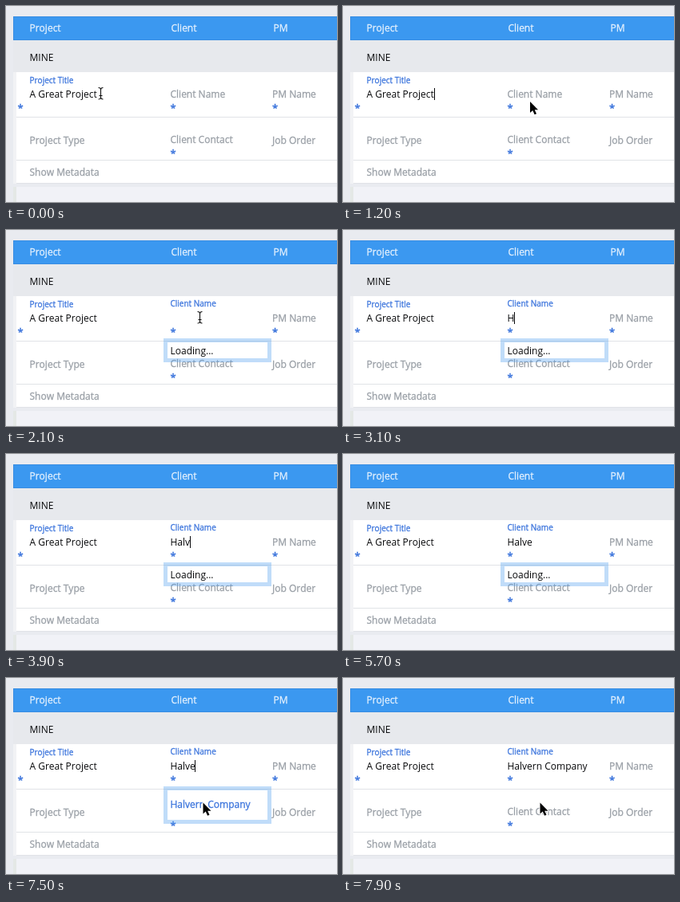
Recreate the animation shown at these times as an HTML page with a canvas. Size 414 by 246 pixels, loop 8 s.

```html
<!DOCTYPE html>
<html lang="en">
<head>
<meta charset="utf-8">
<title>Project form</title>
<style>
  html, body { margin: 0; width: 100%; height: 100%; overflow: hidden; background: #e9ebf0; }
  canvas { display: block; width: 414px; height: 246px; }
</style>
</head>
<body>
<canvas id="stage"></canvas>
<script>
const W = 414, H = 246, LOOP = 8000, STEP = 100;
const INK = '#08090b', HINT = '#999fa6', BLUE = '#3b74dc', PALE = '#e3f0fd';
const COMPANY = 'Halvern Company';
const CLIENT_X = 205.5;

const canvas = document.getElementById('stage');
const ctx = canvas.getContext('2d');
const ratio = window.devicePixelRatio || 1;
canvas.width = W * ratio;
canvas.height = H * ratio;

// [time, number of letters in the client field]
const typing = [[3000, 1], [3400, 2], [3500, 3], [3900, 4], [4200, 5], [7700, COMPANY.length]];
// [time, x, y] of the pointer's hot spot
const path = [[800, 118, 110], [1000, 172, 114], [1200, 234, 120], [1400, 240, 117], [1600, 242, 110]];

const within = (t, a, b) => t >= a && t < b;
const mix = (a, b, k) => a + (b - a) * k;

function setFont(size, weight = 400) {
  ctx.font = `${weight} ${size}px "Open Sans", "Noto Sans", sans-serif`;
  ctx.fontKerning = 'none';
}

function rect(x, y, w, h, color) {
  ctx.fillStyle = color;
  ctx.fillRect(x, y, w, h);
}

// A hairline stroke gives light text the fuller weight of smoothed glyphs
function text(str, x, y, color = INK, size = 12, weight = 400) {
  setFont(size, weight);
  ctx.fillStyle = ctx.strokeStyle = color;
  ctx.fillText(str, x, y);
  if (color !== INK) {
    ctx.lineWidth = 0.3;
    ctx.strokeText(str, x, y);
  }
}

const star = (x, y) => text('*', x, y, BLUE, 13, 600);
const caret = x => rect(Math.round(x), 103, 1, 15, INK);

function pointerAt(t) {
  if (t <= path[0][0]) return path[0].slice(1);
  for (let i = 1; i < path.length; i++) {
    const [t0, x0, y0] = path[i - 1], [t1, x1, y1] = path[i];
    if (t <= t1) {
      const k = (t - t0) / (t1 - t0);
      return [mix(x0, x1, k), mix(y0, y1, k)];
    }
  }
  return path[path.length - 1].slice(1);
}

function beam(x, y) {
  ctx.save();
  ctx.translate(Math.round(x) + 0.5, Math.round(y));
  ctx.beginPath();
  ctx.moveTo(-3, -7.5);
  ctx.quadraticCurveTo(0, -7.5, 0, -5);
  ctx.quadraticCurveTo(0, -7.5, 3, -7.5);
  ctx.moveTo(0, -5);
  ctx.lineTo(0, 4.5);
  ctx.moveTo(-3, 7);
  ctx.quadraticCurveTo(0, 7, 0, 4.5);
  ctx.quadraticCurveTo(0, 7, 3, 7);
  ctx.moveTo(-2, 2.5);
  ctx.lineTo(2, 2.5);
  for (const [color, width] of [['rgba(255,255,255,.8)', 2.6], ['#111', 1.1]]) {
    ctx.strokeStyle = color;
    ctx.lineWidth = width;
    ctx.stroke();
  }
  ctx.restore();
}

function arrow(x, y) {
  const points = [[0, 0], [0, 14], [3.2, 11], [5.6, 16.2], [8, 15.2], [5.7, 10.2], [10, 10.2]];
  ctx.save();
  ctx.translate(x, y);
  ctx.beginPath();
  points.forEach(([px, py]) => ctx.lineTo(px, py));
  ctx.closePath();
  ctx.lineJoin = 'round';
  ctx.strokeStyle = '#fff';
  ctx.lineWidth = 2;
  ctx.stroke();
  ctx.fillStyle = '#000';
  ctx.fill();
  ctx.restore();
}

function drawForm() {
  rect(0, 0, W, H, '#e9ebf0');
  rect(9, 13, W, 30, '#388de2');
  rect(10, 14, W, 28, '#3b98f0');
  rect(9, 43, W, 40, '#e7e9ed');
  rect(9, 83, 4, 140, '#f1f2f5');
  rect(13, 83, W, 139, '#fff');
  for (const y of [139, 193, 222]) rect(13, y, W, 1, '#e1e3e7');
  rect(9, 227, 4, H, '#e4e8e6');
  rect(13, 227, W, H, '#f1f2f7');

  text('Project', 29.5, 32, PALE);
  text('Client', 206.5, 32, PALE);
  text('PM', 334.5, 32, PALE);
  text('MINE', 29.5, 69);

  text('Project Title', 29.5, 97, BLUE, 10);
  text('A Great Project', 29.5, 115);
  text('PM Name', 333, 115, HINT);
  text('Project Type', 29.5, 173, HINT);
  text('Client Contact', CLIENT_X, 172, HINT);
  text('Job Order', 333, 173, HINT);
  text('Show Metadata', 29.5, 213, HINT);
  star(14.5, 133);
  star(CLIENT_X, 133);
  star(333, 133);
  star(CLIENT_X, 190);
}

function drawClient(t, focused) {
  if (!focused) {
    text('Client Name', CLIENT_X, 115, HINT);
    return;
  }
  const lift = 1 - (1 - Math.min(1, (t - 1600) / 200)) ** 2;
  text('Client Name', CLIENT_X, mix(115, 96, lift), lift ? BLUE : HINT, mix(12, 10, lift));

  const count = typing.reduce((n, [at, letters]) => t >= at ? letters : n, 0);
  const typed = COMPANY.slice(0, count);
  text(typed, CLIENT_X, 115);
  const blinkOn = within(t, 1600, 2100) || within(t, 2600, 4700) || within(t, 5200, 5700) ||
    within(t, 6200, 6700) || within(t, 7200, 7700);
  if (blinkOn) caret(CLIENT_X - 0.5 + ctx.measureText(typed).width);
}

function drawList(t) {
  const found = t >= 6900;
  const height = found ? 37 : 20;
  // Translucent ring around a white panel
  ctx.strokeStyle = 'rgba(66,150,235,.33)';
  ctx.lineWidth = 5;
  ctx.strokeRect(199.5, 138.5, 130, height + 5);
  rect(202, 141, 125, height, '#fff');
  if (found) text(COMPANY, CLIENT_X, 163, t >= 7400 ? BLUE : INK);
  else if (t >= 1800) text('Loading...', CLIENT_X, 156);
}

function draw(t) {
  ctx.setTransform(ratio, 0, 0, ratio, 0, 0);
  drawForm();

  // Focus briefly falls back to the title before the list settles
  const bounce = within(t, 2000, 2100);
  const focused = t >= 1600 && !bounce;
  drawClient(t, focused);
  if (within(t, 200, 700) || within(t, 1200, 1600) || bounce) caret(114);
  if (focused && t < 7700) drawList(t);

  if (t < 3000) {
    const [x, y] = pointerAt(t);
    const overField = x < 190 || y < 117;
    (overField ? beam : arrow)(x, y);
  } else if (t >= 7400) {
    arrow(246.5, 156.5);
  }
}

const start = performance.now();
function frame() {
  const t = (performance.now() - start) % LOOP;
  draw(Math.floor(t / STEP) * STEP);
  requestAnimationFrame(frame);
}
frame();
</script>
</body>
</html>
```
